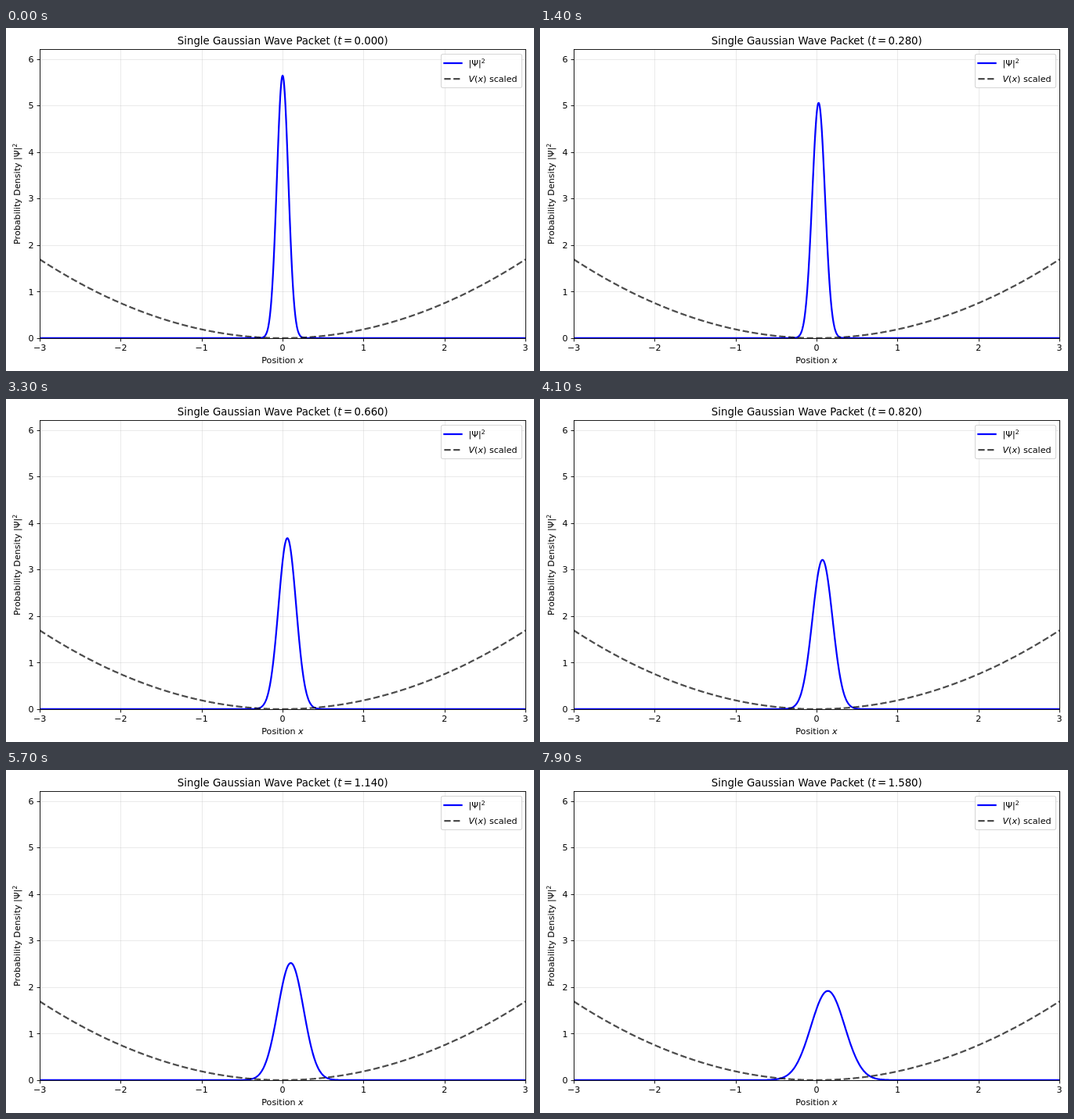
Recreate the animation shown at these times as an HTML page. Size 674 px wide and 439 px high, loop 8 s.

```html
<!DOCTYPE html>
<html lang="en">
<head>
<meta charset="utf-8">
<title>Single Gaussian Wave Packet</title>
<style>
  html, body { margin: 0; width: 100%; height: 100%; overflow: hidden; background: #fff; }
  svg { display: block; width: 674px; height: 439px; }
  text { font: 11.11px "DejaVu Sans", sans-serif; fill: #000; }
  .title { font-size: 13.33px; }
  .sup { font-size: 7.78px; }
  .it { font-style: italic; }
  .mid { text-anchor: middle; }
  .end { text-anchor: end; }
  .grid, .axis { fill: none; stroke-width: .89; }
  .grid { stroke: #b0b0b0; stroke-opacity: .3; }
  .axis { stroke: #000; }
  .psi, .pot { fill: none; stroke-width: 2.22; stroke-linejoin: round; }
  .psi { stroke: #00f; stroke-linecap: square; }
  .pot { stroke: #000; stroke-opacity: .7; stroke-dasharray: 8.22 3.56; }
</style>
</head>
<body>
<svg viewBox="0 0 674 439">
  <defs><clipPath id="area"><rect x="43" y="27" width="620" height="370"/></clipPath></defs>
  <path class="grid" id="grid"/>
  <g clip-path="url(#area)">
    <path class="psi" id="psi"/>
    <path class="pot" id="pot"/>
  </g>
  <path class="axis" id="ticks"/>
  <rect class="axis" x="43.5" y="27.5" width="620" height="370"/>
  <g id="labels"></g>

  <text class="title mid" x="353.3" y="21">Single Gaussian Wave Packet (<tspan class="it">t</tspan><tspan dx="2.4">=</tspan><tspan id="time" dx="2.4">0.000</tspan>)</text>
  <text class="mid" x="353" y="429">Position <tspan class="it">x</tspan></text>
  <text class="mid" transform="translate(18 212.3) rotate(-90)">Probability Density |Ψ|<tspan class="sup" dy="-4.2">2</tspan></text>

  <rect x="555.5" y="33.5" width="103" height="43" rx="2.2" fill="#fff" fill-opacity=".8" stroke="#ccc" stroke-opacity=".8" stroke-width="1.11"/>
  <path class="psi" d="M559.4 45H581.6"/>
  <path class="pot" d="M559.4 65.2H581.6"/>
  <text x="590.5" y="49">|Ψ|<tspan class="sup" dy="-4.2">2</tspan></text>
  <text x="590.5" y="69"><tspan class="it">V</tspan>(<tspan class="it">x</tspan>) scaled</text>
</svg>
<script>
const $ = id => document.getElementById(id);
const px = x => 353.1 + 103.33 * x;
const py = y => 396.9 - 59.55 * y;
const snap = v => Math.floor(v + .5) + .5;

const STEP = 100, STEPS = 80, DT = .02;
const WIDTH = .1, SPREAD = 1.775, OMEGA = .15, WAVENUMBER = 5;
const PEAK = 1 / (WIDTH * Math.sqrt(Math.PI));

function curve(f) {
  const points = [];
  for (let i = 0; i <= 1200; i++) {
    const x = -3 + i / 200;
    points.push(px(x).toFixed(2) + ' ' + py(f(x)).toFixed(3));
  }
  return 'M' + points.join('L');
}

function addLabel(text, x, y, cls) {
  const el = document.createElementNS('http://www.w3.org/2000/svg', 'text');
  el.setAttribute('x', x);
  el.setAttribute('y', y);
  el.setAttribute('class', cls);
  el.textContent = text;
  $('labels').append(el);
}

function drawAxes() {
  let grid = '', ticks = '';
  for (let i = -3; i <= 3; i++) {
    const x = snap(px(i));
    grid += `M${x} 27V397`;
    ticks += `M${x} 397.5v3.9`;
    addLabel(String(i).replace('-', '−'), px(i), 413, 'mid');
  }
  for (let i = 0; i <= 6; i++) {
    const y = snap(py(i));
    grid += `M43 ${y}H663`;
    ticks += `M43.5 ${y}h-3.9`;
    addLabel(i, 35.6, py(i) + 4.2, 'end');
  }
  $('grid').setAttribute('d', grid);
  $('ticks').setAttribute('d', ticks);
  $('pot').setAttribute('d', curve(x => .3 * PEAK * x * x / 9));
}

// Gaussian packet spreading and drifting in a harmonic well
function drawPacket(t) {
  const s = Math.sin(OMEGA * t) / OMEGA;
  const width = WIDTH * Math.hypot(Math.cos(OMEGA * t), SPREAD * s);
  const center = WAVENUMBER * SPREAD * WIDTH * WIDTH * s;
  const peak = PEAK * WIDTH / width;
  $('psi').setAttribute('d', curve(x => peak * Math.exp(-(((x - center) / width) ** 2))));
  $('time').textContent = t.toFixed(3);
}

let shown = -1;
const start = performance.now();
function tick() {
  const step = Math.floor((performance.now() - start) / STEP) % STEPS;
  if (step !== shown) drawPacket((shown = step) * DT);
  requestAnimationFrame(tick);
}

drawAxes();
tick();
</script>
</body>
</html>
```
